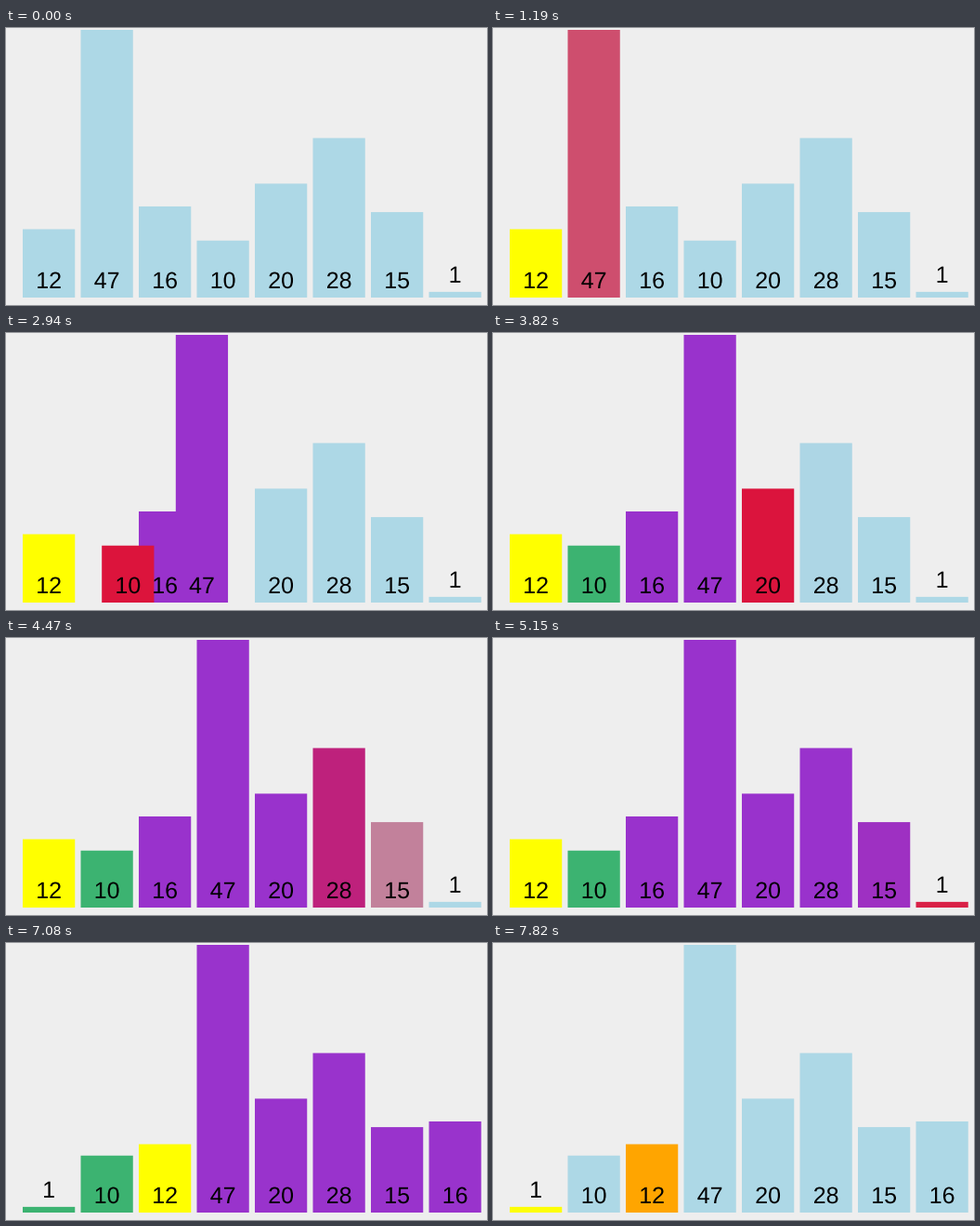
Write a matplotlib script that moves like this. It is 518 px wide and 298 px high and loops after 8 s.

```python
import matplotlib.pyplot as plt
import numpy as np
from matplotlib.animation import FuncAnimation
from matplotlib.colors import to_rgb
from matplotlib.patches import PathPatch, Rectangle
from matplotlib.textpath import TextPath
from matplotlib.transforms import Affine2D

W, H, DPI = 518, 298, 100
LOOP, STEP = 8000, 20
VALUES = [12, 47, 16, 10, 20, 28, 15, 1]
LEFT, PITCH, BAR_W = 18, 62.5, 56.25
BASE, UNIT = 8, 288 / 47
FONT, DIGIT = 25, 0.556
MOVE = 300  # ms per transition

IDLE, PIVOT, CURRENT = "lightblue", "yellow", "crimson"
SMALLER, LARGER, SORTED = "mediumseagreen", "darkorchid", "orange"


def paint(start, hold=None, **colors):
    """Recolour bars named v<value>."""
    return start, hold, {int(k[1:]): c for k, c in colors.items()}, None


def swap(start, a, b, hold=None):
    return start, hold, {}, (a, b)


# One quicksort partition around 12; hold = (time, length) of a pause.
STEPS = [
    paint(470, v12=PIVOT),
    paint(1006, hold=(1190, 80), v47=CURRENT),
    paint(1605, v47=LARGER, v16=CURRENT),
    paint(2106, v16=LARGER, v10=CURRENT),
    swap(2652, 47, 10, hold=(2800, 95)),
    paint(3260, v10=SMALLER, v20=CURRENT),
    paint(3781, v20=LARGER, v28=CURRENT),
    paint(4316, v28=LARGER, v15=CURRENT),
    paint(4847, hold=(5000, 70), v15=LARGER, v1=CURRENT),
    swap(5462, 16, 1),
    paint(5972, v1=SMALLER),
    swap(6522, 12, 1),
    paint(7050, v12=SORTED, **{f"v{v}": IDLE for v in VALUES if v != 12}),
    paint(7575, v1=PIVOT),
]


def ease(p):
    p = min(max(p, 0), 1)
    return 4 * p**3 if p < 0.5 else 1 - 4 * (1 - p) ** 3


def progress(t, start, hold):
    if hold:
        at, length = hold
        t = min(t, at) if t < at + length else t - length
    return ease((t - start) / MOVE)


def state(t):
    slot = {v: float(i) for i, v in enumerate(VALUES)}
    color = {v: np.array(to_rgb(IDLE)) for v in VALUES}
    for start, hold, colors, pair in STEPS:
        if t <= start:
            break
        k = progress(t, start, hold)
        for v, c in colors.items():
            color[v] = color[v] + (np.array(to_rgb(c)) - color[v]) * k
        if pair:
            a, b = pair
            shift = (slot[b] - slot[a]) * k
            slot[a] += shift
            slot[b] -= shift
    return slot, color


fig = plt.figure(figsize=(W / DPI, H / DPI), dpi=DPI, facecolor="#eeeeee")
ax = fig.add_axes([0, 0, 1, 1])
ax.set_xlim(0, W)
ax.set_ylim(0, H)
ax.axis("off")

bars, labels = {}, {}
for v in VALUES:
    bars[v] = Rectangle((0, BASE), BAR_W, v * UNIT, lw=0, snap=False, zorder=1)
    ax.add_patch(bars[v])
    glyphs = TextPath((0, 0), str(v), size=FONT, prop={"family": "Liberation Sans"})
    labels[v] = PathPatch(glyphs, fc="black", lw=0, snap=False, zorder=2)
    ax.add_patch(labels[v])


def draw(i):
    slot, color = state(i * STEP)
    for v in VALUES:
        x = LEFT + PITCH * slot[v]
        bars[v].set_x(x)
        bars[v].set_facecolor(color[v])
        height = v * UNIT
        # labels sit above bars too short to hold them
        y = BASE + 10 + (height if height < FONT else 0)
        tx = x + (BAR_W - len(str(v)) * DIGIT * FONT) / 2
        labels[v].set_transform(Affine2D().translate(tx, y) + ax.transData)
    return [*bars.values(), *labels.values()]


anim = FuncAnimation(fig, draw, frames=LOOP // STEP, interval=STEP,
                     repeat=True, repeat_delay=0)
plt.show()
```
